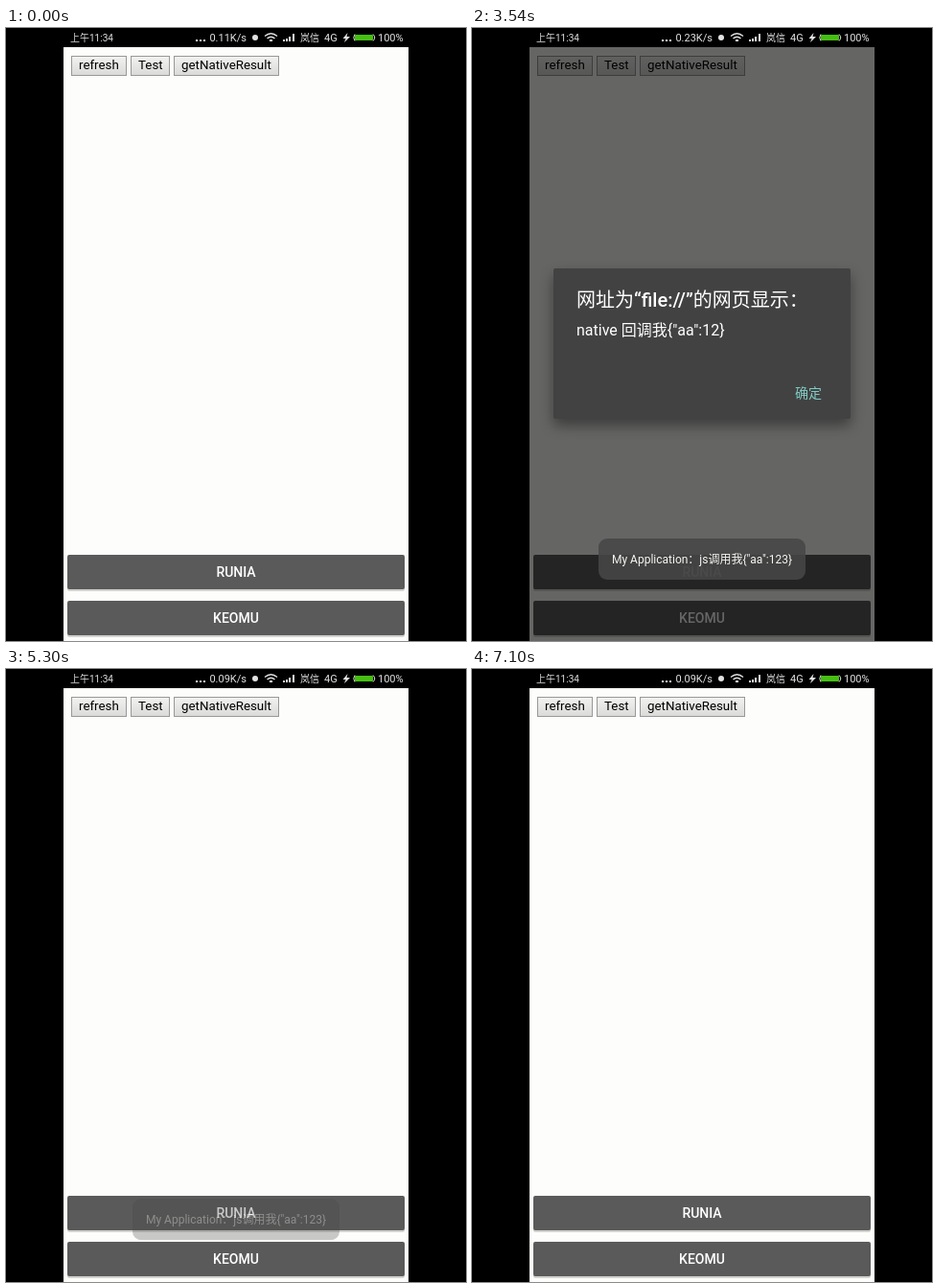
An HTML page for the animation above (8000 ms loop, 480 by 640 pixels).

```html
<!DOCTYPE html>
<html lang="zh">
<head>
<meta charset="utf-8">
<style>
  html, body { margin: 0; width: 100%; height: 100%; overflow: hidden; background: #000; }
  svg { display: block; width: 100vw; height: 100vh; }
  text { font-family: Roboto, "Noto Sans CJK SC", "Noto Sans CJK", sans-serif; white-space: pre; }
  .status { font-size: 11px; fill: #e2e2e2; }
  .small { font-size: 10px; }
  .web text { font-size: 13.33px; }
  .web rect { fill: url(#webFill); stroke: #989898; }
  .native text { font-size: 14px; font-weight: 500; fill: #fff; text-anchor: middle; }
  #panel { filter: drop-shadow(0 7px 7px rgba(0, 0, 0, .4)); }
</style>
</head>
<body>
<svg viewBox="0 0 480 640" preserveAspectRatio="none">
  <defs>
    <linearGradient id="webFill" x2="0" y2="1">
      <stop stop-color="#f2f2f0"/><stop offset="1" stop-color="#dadad8"/>
    </linearGradient>
    <clipPath id="screen"><rect x="60" width="360" height="640"/></clipPath>
  </defs>
  <rect width="480" height="640"/>

  <g clip-path="url(#screen)">
    <rect x="60" y="20" width="360" height="620" fill="#fdfdfb"/>
    <g class="web">
      <rect x="68.5" y="29.5" width="57" height="20"/><text x="76" y="43">refresh</text>
      <rect id="testKey" x="130.5" y="29.5" width="40" height="20"/><text x="138" y="43">Test</text>
      <rect id="resultKey" x="175.5" y="29.5" width="109" height="20"/><text x="183" y="43">getNativeResult</text>
    </g>
    <g class="native">
      <g fill="#d2d2ce">
        <rect x="64" y="552" width="352" height="36" rx="2"/>
        <rect x="64" y="600" width="352" height="36" rx="2"/>
      </g>
      <g fill="#5a5a5a">
        <rect x="64" y="550" width="352" height="36" rx="2"/>
        <rect x="64" y="598" width="352" height="36" rx="2"/>
      </g>
      <text x="240" y="573">RUNIA</text>
      <text x="240" y="621">KEOMU</text>
    </g>

    <rect id="dim" x="60" y="20" width="360" height="620"/>

    <g id="dialog">
      <rect id="panel" x="85" y="251" width="310" height="157" rx="2" fill="#424242"/>
      <rect id="okFlash" x="325" y="363" width="52" height="36" rx="2" fill="#fff"/>
      <text x="109" y="290.5" font-size="20" font-weight="500" fill="#fff"><tspan font-weight="400">网址为</tspan>“file://”<tspan font-weight="400">的网页显示：</tspan></text>
      <text id="message" x="109" y="321" font-size="16" fill="#fff"></text>
      <text x="337" y="386" font-size="14" fill="#80cbc4">确定</text>
    </g>

    <g id="toast">
      <rect x="132" y="533" width="216" height="43" rx="9" fill="#474747" fill-opacity=".87"/>
      <text x="240" y="559" font-size="12" text-anchor="middle" fill="#f6f6f2">My Application：js调用我{"aa":123}</text>
    </g>
  </g>

  <g class="status">
    <text class="small" x="67" y="14">上午11:34</text>
    <path d="M198 13h2m2 0h2m2 0h2" stroke="#e2e2e2" stroke-width="2"/>
    <text id="speed" x="251" y="14" text-anchor="end"></text>
    <circle cx="260" cy="10" r="3"/>
    <g fill="none" stroke="#e2e2e2" stroke-width="1.4">
      <path d="M270 8.5Q276.500 3 283 8.500M272.500 11Q276.500 7.500 280.500 11"/>
      <path d="M275 13h3" stroke-width="2"/>
      <path d="M290 14v-2m3 2v-3m3 3v-5m4 5v-8" stroke-width="2"/>
    </g>
    <text class="small" x="307" y="14">岚信</text>
    <text x="332" y="14">4G</text>
    <path d="M356.500 5l-5 6h3l-1.500 4 6-6h-3.500z"/>
    <rect x="364" y="7" width="19" height="6" rx="1" fill="#46bf12"/>
    <path d="M364 6.500q-2.500 3.500 0 7M383 6.500q3.500 3.500 0 7" fill="none" stroke="#e2e2e2"/>
    <text x="388" y="14">100%</text>
  </g>
</svg>
<script>
const LOOP = 8000;
const el = id => document.getElementById(id);
const ramp = (t, from, to) => Math.min(1, Math.max(0, (t - from) / (to - from)));
const pulse = (t, from, to) => Math.sin(Math.PI * ramp(t, from, to));
const outBack = p => 1 + 2.7 * (p - 1) ** 3 + 1.7 * (p - 1) ** 2;
const inQuad = p => p * p;

function draw(t) {
  const second = t >= 4500;
  el('speed').textContent = t < 500 ? '0.11K/s' : second ? '0.09K/s' : '0.23K/s';
  el('message').textContent = second ? 'nativeResult' : 'native 回调我{"aa":12}';

  const dim = ramp(t, 2100, 2380) - ramp(t, 3640, 3900)
            + ramp(t, 5530, 5810) - ramp(t, 6820, 7090);
  const shown = ramp(t, 2080, 2240) - ramp(t, 3620, 3760)
              + ramp(t, 5510, 5670) - ramp(t, 6800, 6940);
  el('dim').setAttribute('opacity', 0.6 * dim);
  el('dialog').setAttribute('opacity', shown);
  el('okFlash').setAttribute('opacity', 0.12 * (pulse(t, 3540, 3740) + pulse(t, 6700, 6920)));

  const enter = ramp(t, 1960, 2480), leave = ramp(t, 5100, 5400);
  const offset = 45 * (1 - outBack(enter)) + 45 * inQuad(leave);
  el('toast').setAttribute('transform', `translate(0 ${offset})`);
  el('toast').setAttribute('opacity', ramp(t, 1960, 2160) * (1 - leave));

  el('testKey').style.fillOpacity = 1 - 0.25 * pulse(t, 1860, 2300);
  el('resultKey').style.fillOpacity = 1 - 0.25 * pulse(t, 5300, 5720);
}

function tick() {
  draw(performance.now() % LOOP);
  requestAnimationFrame(tick);
}
tick();
</script>
</body>
</html>
```
